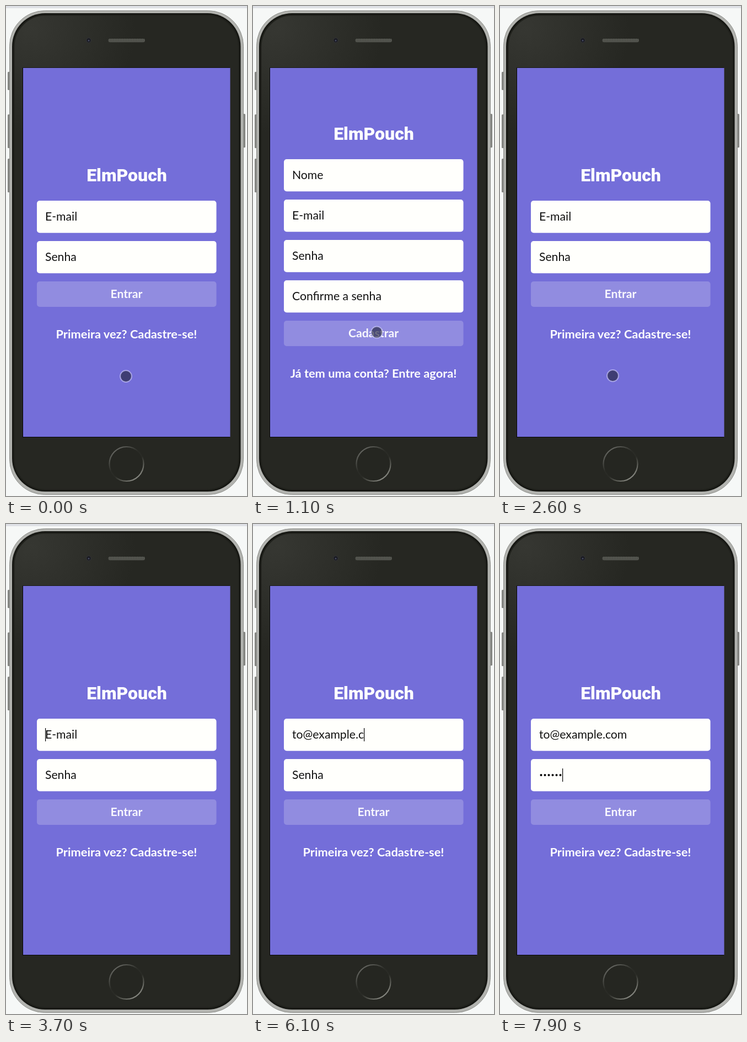
Write an HTML page that moves like this. It is 437 px wide and 886 px high and loops after 8 s.

```html
<!DOCTYPE html>
<html lang="pt-BR">
<head>
<meta charset="utf-8">
<title>Login</title>
<style>
  html, body { margin: 0; width: 100%; height: 100%; overflow: hidden; background: #f6f8f7; }
  svg { display: block; }
  text { font-family: Lato, "Open Sans", sans-serif; font-size: 21.2px; fill: #111; }
  .bold { font-weight: 700; fill: #fff; text-anchor: middle; }
  .link { font-size: 21.8px; }
  .brand { font: 900 32px Roboto, Inter, sans-serif; fill: #fff; text-anchor: middle; }
</style>
</head>
<body>
<svg id="stage" width="437" height="886" viewBox="0 0 437 886">
  <defs>
    <radialGradient id="shine" gradientUnits="userSpaceOnUse" cx="45" cy="40" r="190">
      <stop offset="0" stop-color="#363732"/>
      <stop offset="1" stop-color="#262722"/>
    </radialGradient>
    <linearGradient id="ring" x1="0.2" y1="0.1" x2="0.8" y2="0.9">
      <stop offset="0" stop-color="#62635e"/>
      <stop offset="0.4" stop-color="#2a2b26"/>
      <stop offset="0.6" stop-color="#2a2b26"/>
      <stop offset="1" stop-color="#85867f"/>
    </linearGradient>
    <pattern id="mesh" width="3" height="3" patternUnits="userSpaceOnUse">
      <rect width="3" height="3" fill="#64655f"/>
      <path d="M0 0L3 3M3 0L0 3" stroke="#3b3c37" stroke-width="0.8"/>
    </pattern>
  </defs>

  <rect width="437" height="886" fill="#f6f8f7"/>
  <rect width="437" height="4" fill="#dfe1e6"/>
  <g fill="#858682">
    <rect x="3" y="119" width="5" height="33" rx="1.5"/>
    <rect x="3" y="196" width="5" height="61" rx="1.5"/>
    <rect x="3" y="276" width="5" height="61" rx="1.5"/>
    <rect x="429" y="195" width="5" height="61" rx="1.5"/>
  </g>
  <rect x="6.5" y="8.5" width="424" height="875" rx="64" fill="#b2b3af" stroke="#8e8f8b"/>
  <rect x="11" y="13" width="414.5" height="865" rx="60" fill="#161713"/>
  <rect x="14.5" y="16.5" width="407.5" height="858" rx="57" fill="url(#shine)" stroke="#20211c" stroke-width="2"/>
  <circle cx="150" cy="62" r="4.2" fill="#191a20" stroke="#35363a"/>
  <circle cx="150" cy="62.5" r="1.5" fill="#454860"/>
  <rect x="185.5" y="59" width="66.5" height="6.5" rx="3" fill="url(#mesh)"/>
  <circle cx="218.5" cy="828" r="31" fill="#252621" stroke="url(#ring)" stroke-width="2.2"/>
  <rect x="30" y="111.5" width="376" height="668.5" fill="#050507"/>
  <rect x="31" y="112" width="375.5" height="667" fill="#746ed9"/>

  <g id="login"></g>
  <g id="signup"></g>
  <rect id="caret" width="1.2" height="24" fill="#000"/>
  <circle id="pointer" r="10.4" fill="#22233c" fill-opacity="0.65" stroke="#d2ceff" stroke-opacity="0.62" stroke-width="2"/>
</svg>
<script>
const LOOP = 8000, TICK = 100, TEXT_X = 71, DOT_PITCH = 7;
const EMAIL = "to@example.com", PASSWORD_LENGTH = 6;
const $ = id => document.getElementById(id);

function add(parent, tag, attrs, text = "") {
  const node = document.createElementNS("http://www.w3.org/2000/svg", tag);
  for (const name in attrs) node.setAttribute(name, attrs[name]);
  node.textContent = text;
  return parent.appendChild(node);
}

// Lays out one form and returns the text node of each field.
function buildForm(group, top, labels, action, link) {
  add(group, "text", { class: "brand", x: 219, y: top - 35 }, "ElmPouch");
  const fields = labels.map((label, i) => {
    const y = top + i * 73;
    add(group, "rect", { x: 56, y, width: 325.5, height: 58.3, rx: 5, fill: "#fffffc" });
    return add(group, "text", { x: TEXT_X, y: y + 36 }, label);
  });
  const y = top + labels.length * 73;
  add(group, "rect", { x: 56, y, width: 325.5, height: 46, rx: 5, fill: "#918ce0" });
  add(group, "text", { class: "bold", x: 218.5, y: y + 30, "fill-opacity": 0.94 }, action);
  add(group, "text", { class: "bold link", x: 218.5, y: y + 103 }, link);
  return fields;
}

const [emailText, passText] = buildForm($("login"), 352, ["E-mail", "Senha"],
  "Entrar", "Primeira vez? Cadastre-se!");
buildForm($("signup"), 277, ["Nome", "E-mail", "Senha", "Confirme a senha"],
  "Cadastrar", "Já tem uma conta? Entre agora!");

const dots = Array.from({ length: PASSWORD_LENGTH }, (_, i) =>
  add($("login"), "circle", { cx: 74.5 + i * DOT_PITCH, cy: 454, r: 2 }));

const clamp = v => Math.min(1, Math.max(0, v));
const smooth = p => p * p * (3 - 2 * p);

// Each glide eases to its stop, bowing sideways on the way.
const glides = [
  { start: 300, end: 600, x: 224.5, y: 590, bow: 6 },
  { start: 1200, end: 1500, x: 205.5, y: 661.5, bow: 9 },
  { start: 1700, end: 2100, x: 204.5, y: 668.5, bow: 0 },
  { start: 2700, end: 3000, x: 209.5, y: 443, bow: 0 },
  { start: 3100, end: 3300, x: 208.5, y: 390, bow: 1 }
];

function pointerAt(t) {
  let x = 217.5, y = 669.5;
  for (const glide of glides) {
    const p = smooth(clamp((t - glide.start) / (glide.end - glide.start)));
    x += (glide.x - x) * p + glide.bow * Math.sin(Math.PI * p);
    y += (glide.y - y) * p;
  }
  return { x, y };
}

// Keys pressed so far in a run of evenly spaced strokes.
const strokes = (t, start, gap, count) =>
  Math.min(count, Math.max(0, Math.floor((t - start) / gap) + 1));

const emailLength = t => strokes(t, 4300, 100, 3) + strokes(t, 4700, 300, 3)
  + strokes(t, 5500, 50, 3) + strokes(t, 5900, 100, 5);
const passwordLength = t => strokes(t, 7300, 100, 1) + strokes(t, 7450, 75, 3)
  + strokes(t, 7800, 100, 2);

const show = (node, on) => node.setAttribute("visibility", on ? "inherit" : "hidden");

function render(t) {
  const signup = t >= 1100 && t < 2600;
  $("login").style.display = signup ? "none" : "";
  $("signup").style.display = signup ? "" : "none";

  const typed = emailLength(t), secret = passwordLength(t);
  emailText.textContent = typed ? EMAIL.slice(0, typed) : "E-mail";
  passText.textContent = secret ? "" : "Senha";
  dots.forEach((dot, i) => show(dot, i < secret));

  const inPassword = t >= 6600;
  const advance = inPassword ? secret * DOT_PITCH
    : typed ? emailText.getComputedTextLength() : 0;
  $("caret").setAttribute("x", TEXT_X + Math.round(advance));
  $("caret").setAttribute("y", inPassword ? 442 : 369);
  show($("caret"), t >= 3500);

  const { x, y } = pointerAt(t);
  $("pointer").setAttribute("cx", x);
  $("pointer").setAttribute("cy", y);
  $("pointer").setAttribute("opacity", clamp((3700 - t) / 300));
}

const start = performance.now();
function frame() {
  const t = (performance.now() - start) % LOOP;
  render(Math.floor(t / TICK) * TICK);
  requestAnimationFrame(frame);
}
frame();
</script>
</body>
</html>
```
